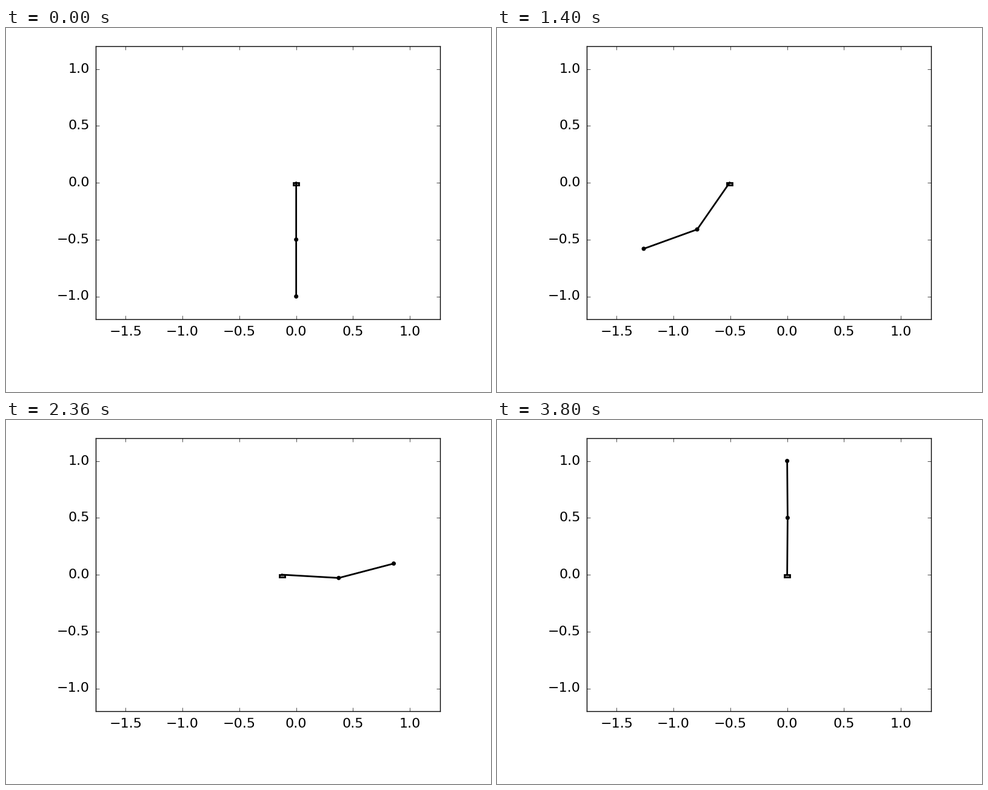
These frames come from a looping animation (800 px wide and 600 px high, 3.84 s). A matplotlib script:

```python
"""Swing-up of a double pendulum on a cart.

The motion is solved from the equations of motion through a few key poses.
"""
import numpy as np
import matplotlib.pyplot as plt
from matplotlib.animation import FuncAnimation
from matplotlib.lines import Line2D
from matplotlib.patches import Circle, Rectangle

FRAMES, INTERVAL = 96, 40
ROD = 0.5
GRAVITY = 9.81 / ROD * (INTERVAL / 1000) ** 2   # per frame squared
MASS_RATIO = 0.5                                # outer mass / both masses
PI = np.pi

# frame: cart, inner angle, outer angle (from hanging)
POSES = {
    0: (0, 0, 0),
    21: (-0.653, 0.061, 0.507),
    35: (-0.507, -0.607, -1.224),
    51: (0.265, 0.150, 0.182),
    66: (-0.763, 2.285, 2.285),
    77: (0.032, 3.332, 3.104),
    95: (0, PI - 0.008, PI + 0.008),
}
# Way points between the poses: the cart, and the outer bob
CART = {14: -0.369, 42: -0.14, 70: -0.571, 84: 0.067}
TIP = {28: (-0.964, -0.96), 56: (0.993, -0.373)}


def bobs(q):
    """Positions of the inner and the outer bob."""
    x, a, b = np.moveaxis(q, -1, 0)
    inner = np.stack([x + ROD * np.sin(a), -ROD * np.cos(a)], -1)
    return inner, inner + ROD * np.stack([np.sin(b), -np.cos(b)], -1)


def residuals(flat, weight):
    q = flat.reshape(-1, FRAMES, 3)
    acc = np.diff(q, 2, axis=1)
    vel = (q[:, 2:] - q[:, :-2]) / 2
    a, b = q[:, 1:-1, 1], q[:, 1:-1, 2]
    push = acc[..., 0] / ROD
    c, s = np.cos(a - b), np.sin(a - b)
    inner = (acc[..., 1] + MASS_RATIO * (c * acc[..., 2] + s * vel[..., 2] ** 2)
             + GRAVITY * np.sin(a) + push * np.cos(a))
    outer = (acc[..., 2] + c * acc[..., 1] - s * vel[..., 1] ** 2
             + GRAVITY * np.sin(b) + push * np.cos(b))
    jerk = np.diff(q, 4, axis=1)
    parts = [
        weight * inner,
        weight * outer,
        100 * jerk[..., 0],
        20 * jerk[..., 1:],
        600 * (q[:, list(POSES)] - list(POSES.values())),
        300 * (q[:, list(CART), 0] - list(CART.values())),
        100 * (bobs(q)[1][:, list(TIP)] - list(TIP.values())),
        300 * (q[:, 1] - q[:, 0]),       # at rest at both ends
        300 * (q[:, -1] - q[:, -2]),
    ]
    return np.concatenate([p.reshape(len(q), -1) for p in parts], axis=1)


def refine(z, weight, rounds=15):
    """Levenberg-Marquardt steps for one weight of the equations of motion."""
    eps, damping = 1e-6, 1e-3
    nudges = eps * np.eye(z.size)
    r = residuals(z, weight)[0]
    for _ in range(rounds):
        jac = (residuals(z + nudges, weight) - r).T / eps
        normal, slope = jac.T @ jac, jac.T @ r
        for _ in range(8):
            damped = normal + damping * np.diag(np.diag(normal))
            trial = z - np.linalg.solve(damped, slope)
            r_new = residuals(trial, weight)[0]
            if r_new @ r_new < r @ r:
                break
            damping *= 6
        else:
            return z
        z, r = trial, r_new
        damping = max(damping / 6, 1e-9)
    return z


def swing_up():
    keys = np.array(list(POSES.values()))
    z = np.column_stack([np.interp(range(FRAMES), list(POSES), k)
                         for k in keys.T]).ravel()
    for weight in (0, 20, 80, 250, 600):
        z = refine(z, weight)
    return z.reshape(FRAMES, 3)


motion = swing_up()
inner_path, outer_path = bobs(motion)

plt.style.use("classic")
plt.rcParams.update({"font.family": "DejaVu Sans", "font.size": 16})
fig = plt.figure(figsize=(8, 6), dpi=100, facecolor="white")
ax = fig.add_axes([0.185, 0.2, 0.71, 0.75])
ax.set_xlim(-1.7633, 1.266)
ax.set_ylim(-1.2, 1.2)
ax.set_xticks(np.arange(-1.5, 1.1, 0.5))
ax.set_yticks(np.arange(-1, 1.1, 0.5))
ax.tick_params(axis="x", pad=8)
ax.tick_params(axis="y", pad=7.3)

CAR_W, CAR_H = 0.05, 0.02
car = Rectangle((0, -CAR_H), CAR_W, CAR_H, facecolor="0.75",
                edgecolor="black", linewidth=2, zorder=0.9)
joint = Circle((0, 0), 0.005, color="black")
balls = [Circle((0, 0), 0.015, color="black", zorder=2) for _ in range(2)]
rods = [Line2D([], [], color="black", linewidth=2, zorder=1) for _ in range(2)]
for patch in (car, joint, *balls):
    ax.add_patch(patch)
for rod in rods:
    ax.add_line(rod)


def draw(i):
    x = motion[i, 0]
    points = [(x, 0), inner_path[i], outer_path[i]]
    car.set_x(x - CAR_W / 2)
    joint.center = points[0]
    for k in range(2):
        balls[k].center = tuple(points[k + 1])
        rods[k].set_data(*zip(points[k], points[k + 1]))
    return (car, joint, *balls, *rods)


anim = FuncAnimation(fig, draw, frames=FRAMES, interval=INTERVAL,
                     init_func=lambda: draw(0), repeat=True, repeat_delay=0)
plt.show()
```
